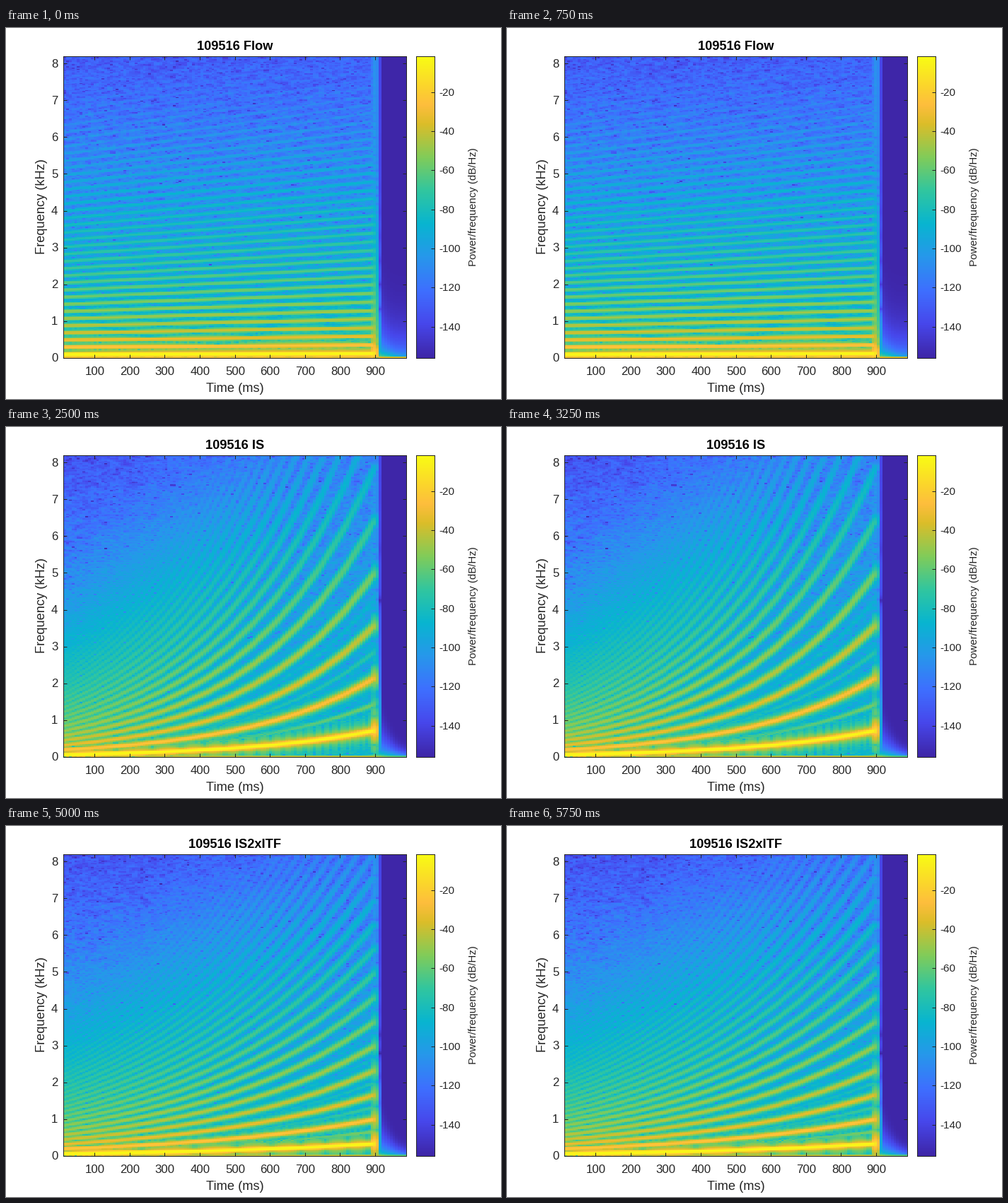
These frames come from a looping animation (700x525 px, 6250 ms). A matplotlib script:

```python
import numpy as np
import matplotlib.pyplot as plt
from matplotlib.animation import FuncAnimation
from matplotlib.colors import LinearSegmentedColormap

W, H, DPI = 700, 525, 100
PX = 72 / DPI                       # one pixel in points
FS, WIN, HOP = 16384, 512, 128
NYQ = FS / 2
END = int(0.9 * FS)                 # the sweep stops here, then silence
VMIN, VMAX = -156, -1.7
INK = "0.15"

plt.rcParams["font.family"] = "Liberation Sans"

STOPS = [0, 7, 14, 21, 28, 35, 42, 49, 53, 56, 63]
COLORS = ("#3e26a8 #4747eb #3e6fff #2797eb #08b5d0 #31c69f "
          "#81cc59 #dcbd29 #febe3d #fccf30 #f9fb15").split()
PARULA = LinearSegmentedColormap.from_list(
    "parula", [(s / 63, c) for s, c in zip(STOPS, COLORS)])

# title, start Hz, end Hz, noise slope at start and end (dB/kHz), dc, click
SWEEPS = [
    ("109516 Flow", 97, 117, 5.3, 5.1, .1, 0),
    ("109516 GT", 62, 720, 6.1, 3.3, .005, .3),
    ("109516 IS", 62, 720, 5.7, 3.4, .005, 0),
    ("109516 IS2", 62, 720, 5.9, 3.4, .005, 0),
    ("109516 IS2xITF", 62, 333, 5.6, 4.6, .005, 0),
]


def amp(db):
    return 10 ** (db / 20)


def hiss(slope, seed):
    """Noise whose density falls by a fixed slope in dB per kHz."""
    spec = np.fft.rfft(np.random.default_rng(seed).standard_normal(FS))
    khz = np.fft.rfftfreq(FS, 1 / FS) / 1000
    return np.fft.irfft(spec * amp(-45 - slope * khz), FS)[:END]


def sweep(f_start, f_end, slope_a, slope_b, dc, click, seed):
    """Odd-harmonic exponential sweep over coloured noise."""
    n = np.arange(END)
    u = n / END
    f = f_start * (f_end / f_start) ** u
    phase = 2 * np.pi * np.cumsum(f) / FS
    x = hiss(slope_a, seed) * (1 - u ** 2) + hiss(slope_b, seed) * u ** 2
    for h in range(1, int(NYQ / f_start) + 1):
        db = 17 - 12 * np.log2(h) - .2 * h - .55 * (h * f / 1000) ** 2
        if h % 2 == 0:
            db = db - 58 + 20 * u ** 2
        x += amp(db) * np.sin(h * phase) * (h * f < NYQ)

    ramp = np.sin(np.linspace(0, np.pi / 2, 65)) ** 2
    x[:65] *= ramp
    x[-65:] *= ramp[::-1]
    x += click * np.exp(-(n - 140) / 60) * (n >= 140)

    tail = .04 + dc
    rest = dc + tail * np.exp(-np.arange(FS - END) / 250)
    return np.concatenate([x + dc + tail + .012, rest])


def spectrogram(x):
    """Power density in dB, one column per hop."""
    win = np.hanning(WIN)
    cols = (FS - WIN) // HOP + 1
    seg = x[np.arange(WIN)[:, None] + HOP * np.arange(cols)] * win[:, None]
    power = np.abs(np.fft.rfft(seg, axis=0)) ** 2 / (FS * np.sum(win ** 2))
    power[1:-1] *= 2
    return 10 * np.log10(power + np.finfo(float).eps)


maps = [spectrogram(sweep(*p[1:], seed)) for seed, p in enumerate(SWEEPS, 7)]

fig = plt.figure(figsize=(W / DPI, H / DPI), dpi=DPI, facecolor="white")


def px_axes(x0, y0, x1, y1):
    ax = fig.add_axes([x0 / W, 1 - y1 / H, (x1 - x0) / W, (y1 - y0) / H])
    for side in ax.spines.values():
        side.set(linewidth=PX, color=INK)
    ax.tick_params(direction="in", length=5 * PX, width=PX, color=INK,
                   labelbottom=False, labelleft=False)
    return ax


def label(x, y, s, size, ha="center", **kw):
    kw = {"color": INK, **kw}
    return fig.text(x / W, 1 - y / H, s, fontsize=size * PX, ha=ha,
                    va="baseline", rotation_mode="anchor", **kw)


ax = px_axes(81, 40, 566, 467)
half_t, half_f = HOP / FS * 500, FS / WIN / 2000
t0 = WIN / FS * 500 - half_t
t1 = 1000 - t0
img = ax.imshow(maps[0], origin="lower", aspect="auto", cmap=PARULA,
                vmin=VMIN, vmax=VMAX, interpolation="nearest",
                extent=(t0, t1, -half_f, NYQ / 1000 + half_f))
ax.set_ylim(0, NYQ / 1000)
ax.set_xticks(range(100, 1000, 100))
ax.set_yticks(range(9))
ax.tick_params(top=True, right=True)

bar = px_axes(580, 40, 606, 467)
bar.imshow(np.linspace(VMIN, VMAX, 256)[:, None], origin="lower",
           aspect="auto", cmap=PARULA, extent=(0, 1, VMIN, VMAX))
bar.set_xticks([])
bar.set_yticks(range(-140, 0, 20))
bar.tick_params(left=False, right=True)

for ms in range(100, 1000, 100):
    label(81.5 + 485 * (ms - t0) / (t1 - t0), 491, str(ms), 16.7)
for k in range(9):
    label(73.5, 472.5 - 427 * k / (NYQ / 1000), str(k), 16.7, ha="right")
for db in range(-140, 0, 20):
    label(612, 472 - 427 * (db - VMIN) / (VMAX - VMIN), str(db), 15.2,
          ha="left")

label(324, 515, "Time (ms)", 18.3)
label(55, 253, "Frequency (kHz)", 18.3, rotation=90)
label(665.5, 253, "Power/frequency (dB/Hz)", 15, rotation=90)
title = label(324, 31, SWEEPS[0][0], 18.3, weight="bold", color="black")


def update(i):
    img.set_data(maps[i])
    title.set_text(SWEEPS[i][0])
    return img, title


anim = FuncAnimation(fig, update, frames=len(SWEEPS), interval=1250,
                     repeat=True, repeat_delay=0, blit=False)
plt.show()
```
